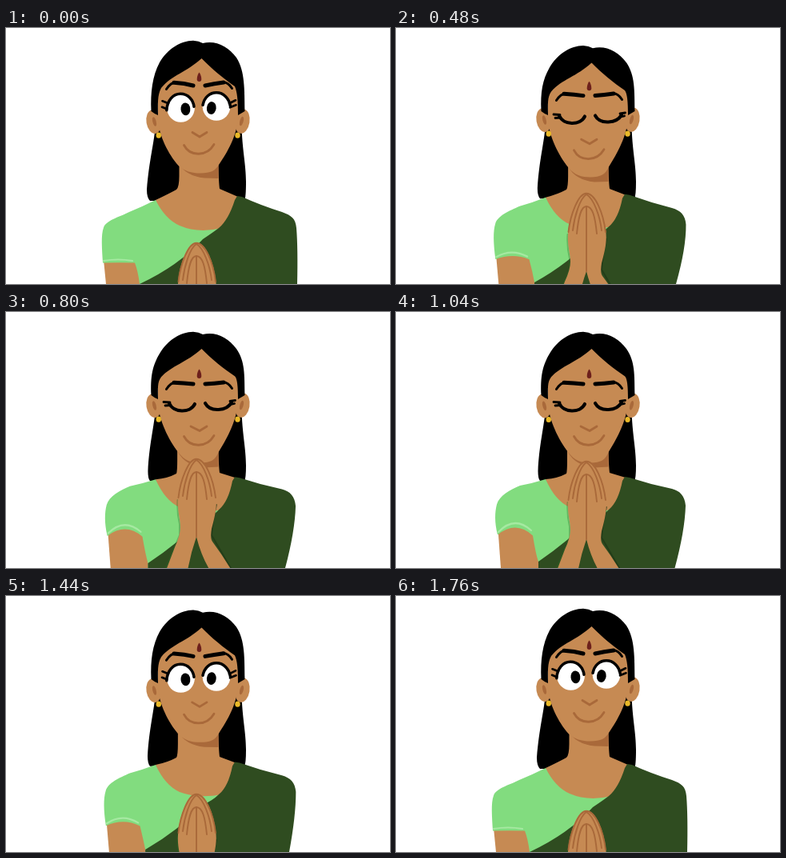
Recreate the animation shown at these times as an HTML page with a canvas. Size 480 px wide and 320 px high, loop 2080 ms.

```html
<!DOCTYPE html>
<html lang="en">
<head>
<meta charset="utf-8">
<title>Greeting</title>
<style>
html, body { margin: 0; width: 100%; height: 100%; overflow: hidden; background: #fff; }
canvas { display: block; width: 480px; height: 320px; }
</style>
</head>
<body>
<canvas id="stage" width="480" height="320"></canvas>
<script>
const ctx = document.getElementById('stage').getContext('2d');
const SKIN = '#c68a53', BROWN = '#a9693a', BLACK = '#000', LIGHT = '#82dc7f', DARK = '#2f4c20';
const LOOP = 2080;

// until (ms), head tilt, ear shift, shoulder raise, right hem x, sari fold y, fingertip y, eyes open
const poses = [
  [320, 0, 0, 0, 364, 320, 268, true],
  [480, -0.1, 0.5, 0.1, 361.5, 326, 260.3, true],
  [640, 0.7, -2, 0.55, 350, 318, 206, false],
  [800, 0.97, -0.5, 0.85, 349, 315, 190, false],
  [1040, 1, 0, 0.95, 349, 314, 183, false],
  [1280, 1, 0.3, 1, 348.5, 312, 186, false],
  [1440, 1, 0.5, 1, 348, 311, 202, false],
  [1600, 0.19, 1, 0.65, 354, 317, 247, true],
  [1760, 0.08, 0.5, 0.3, 359, 321, 261, true],
  [LOOP, 0, 0, 0, 364, 320, 268, true]
].map(([until, tilt, ear, raise, hem, fold, tip, open]) =>
  ({ until, tilt, ear, raise, hem, fold, tip, open }));

function fill(path, color) {
  ctx.fillStyle = color;
  ctx.fill(new Path2D(path));
}

function line(path, color, width) {
  ctx.strokeStyle = color;
  ctx.lineWidth = width;
  ctx.stroke(new Path2D(path));
}

function oval(x, y, rx, ry, color, angle = 0) {
  ctx.fillStyle = color;
  ctx.beginPath();
  ctx.ellipse(x, y, rx, ry, angle, 0, Math.PI * 2);
  ctx.fill();
}

function shifted(dy, draw) {
  ctx.save();
  ctx.translate(0, dy);
  draw();
  ctx.restore();
}

function drawBody({ raise: s, hem, fold }) {
  const bend = s * s;
  const neckX = 216.5 - 2.5 * s, neckY = 215 - 6 * s;
  const sariX = 289 - 3 * Math.min(1, s * 10);
  const sariY = 210 - 4 * s;
  const collar = 250 - 3 * s;
  const cuffX = 121 + 6 * s, cuffY = 293.5 - 15 * bend;
  const innerX = 161 + 10 * s, innerY = 293.5 - 14 * bend;
  const foldX = 167 + 11 * s;

  // hanging hair
  fill(`M187 120 C185 145 179 165 ${176 + 1.5 * s} ${202 - 3 * s}
    Q${176 + 1.5 * s} ${212 - 4 * s} 180 ${216 - 5 * s}
    H298 Q300 ${212 - 4 * s} 300 192 C300 170 295 152 294.5 120Z`, BLACK);

  // neck and chest
  fill(`M${neckX} 160 V185 Q${neckX} 199 213 202 Q202 208 187 ${neckY} L200 260 H275 L${sariX + 1} ${sariY + 1}
    L267 201 Q265.5 190 265.5 160Z`, SKIN);

  // arm
  fill(`M${cuffX} ${cuffY - 14} L${125 + 6 * s} 320 H${foldX + 4} V${innerY - 14}Z`, SKIN);

  // blouse
  fill(`M187 ${neckY} Q199 ${239 - 3 * s} 217 ${247 - 3 * s} Q240 ${257 - 5 * s} 270 ${collar}
    V300 L${foldX + 8} 320 H${foldX} V${fold} Q${innerX + 4} 304 ${innerX} ${innerY}
    Q${142 + 8 * s} ${293 - 8 * s - 25 * bend} ${cuffX} ${cuffY}
    C${120 + 3 * s} ${275 - 12 * s} ${118.5 + 5 * s} ${259 - 9 * s} ${122 + 4 * s} ${249.5 - 9 * s}
    C${125 + 4 * s} ${240.5 - 11 * s} ${140 + 3 * s} ${237 - 15 * s} ${154 + s} ${230 - 13 * s}
    Q171 ${223 - 9 * s} 187 ${neckY}Z`, LIGHT);
  line(`M${cuffX + 1} ${291 - 16 * bend} Q${140 + 8 * s} ${288 - 10 * s - 24 * bend}
    ${158 + 11 * s} ${291 - 18 * bend}`, '#a6e9a2', 2.2);

  // sari
  fill(`M${sariX} ${sariY} L${sariX + 6} ${sariY + 1} Q318 ${221.5 - 6 * s} 345 ${230 - 9 * s}
    C${357 - 2 * s} ${234.5 - 11 * s} ${362 - s} ${238 - 8 * s} ${363 - s} ${250 - 8 * s}
    Q${365 - 4 * s} ${276 - 2 * s} ${hem} 320
    H${foldX} V${fold} Q216 ${1.4 * fold - 151} 246 ${fold - 56} Q258 256 266 ${collar}
    Q278 ${240 - 3 * s} ${sariX - 3} ${sariY + 5}Z`, DARK);
}

function drawEars(dy) {
  shifted(dy, () => {
    oval(184.5, 117.3, 9, 15, SKIN, -0.16);
    oval(295.5, 116.8, 9, 15.2, SKIN, 0.16);
    oval(185.5, 117, 2.2, 6, BROWN, -0.25);
    oval(294.5, 116.5, 2.2, 6, BROWN, 0.25);
  });
}

function drawHead({ tilt: t, ear }) {
  const jaw = 7 * t, parting = 8 * t, top = 9 * t;
  fill(`M215 ${168 + jaw} Q224 ${185 + jaw} 248 ${187.5 + jaw} L265.5 ${188 + jaw * 0.8} V160 H215Z`, BROWN);
  drawEars(ear);
  fill(`M190 60 V115 C191 134 203 ${158 + jaw * 0.3} 215.5 ${172 + jaw * 0.5}
    C223 ${179 + jaw} 232 ${181.5 + jaw} 243 ${181.5 + jaw}
    C256 ${181.5 + jaw} 262 ${178 + jaw} 266 ${171 + jaw * 0.5}
    C277 ${155 + jaw * 0.3} 289 134 290 112 V60 L244 ${34 + parting}Z`, SKIN);

  // hair cap with a centre parting
  fill(`M181.5 104 C180.5 80 183 ${60 + top * 0.8} 192 ${43 + top}
    C202 ${26 + top} 218 ${16 + top} 234 ${15.7 + top}
    Q241 ${16 + top} 246 ${19 + top} C262 ${15 + top} 278 ${23 + top} 288 ${37 + top}
    C299 ${54 + top * 0.9} 298 78 298.5 104 L290 109
    C290 ${90 + top * 0.3} 289 ${80 + top * 0.3} 286 ${73 + top * 0.8}
    C272 ${63 + parting} 257 ${51 + parting} 244.5 ${38 + parting}
    C226 ${55 + parting} 207 ${59 + parting} 194 ${75 + top * 0.7}
    C189 ${84 + top * 0.4} 190 95 190 109 Q185 107 181.5 104Z`, BLACK);

  shifted(ear, () => {
    for (const x of [190.8, 289.5]) oval(x, 134.2, 3.2, 3.6, '#eab928');
  });
}

function drawOpenEyes() {
  oval(218.5, 99.7, 17.4, 17.8, '#fff');
  oval(263, 98.2, 17.3, 17.2, '#fff');
  oval(224.4, 101, 5.9, 7.9, BLACK, -0.1);
  oval(256.8, 99.7, 5.9, 7.9, BLACK, 0.1);
  line('M200.8 102.5 C201.5 90 209 82 218 82 C228 82 234 90 235 98', BLACK, 3.5);
  line('M246 96 C248 86 255 80.5 263 80.5 C272 80.5 279 88 280.3 97', BLACK, 3.5);
  line('M203 94 L195.5 91 M201 101 L195 98.5 M279 94 L287 90 M280 99 L287.5 96', BLACK, 2.7);
}

function drawClosedEyes() {
  line('M204 114 C209 126 230 127 236 115', BLACK, 4.1);
  line('M249 114 C255 125.5 276 124 282 113', BLACK, 4.1);
  line('M197 112.5 L205 113 M199 117 L206 116.5 M280 111.5 L286.5 110.5 M279 116 L285.5 114.5', BLACK, 2.8);
}

function drawFace({ tilt: t, open }) {
  shifted(16 * t, () => fill('M241.5 55.5 C243 57 244.3 61 244.3 64 Q244.3 67 241.5 67 Q238.7 67 238.7 64 C238.7 61 240 57 241.5 55.5Z', '#6d201c'));
  shifted(20 * t, () => {
    line('M200.5 76.5 Q206 68 212 68', BLACK, 3);
    line(`M210 68.3 Q223 69 234 ${72 - 2 * t}`, BLACK, 5);
    line(`M249 ${72 - 2 * t} Q260 69.5 272 68`, BLACK, 5);
    line('M271 67.5 Q278 68 282.5 75.5', BLACK, 3);
  });
  if (open) shifted(16 * t + 0.3, drawOpenEyes);
  else shifted(15 * (t - 1), drawClosedEyes);
  shifted(12.5 * t, () => line(`M${233 - 2 * t} 130.5 L242 136 L251 130.5`, BROWN, 2.8));
  shifted(9 * t, () => line('M222.5 146.5 C230 161 251 161 260 145.5', BROWN, 2.8));
}

function drawHands() {
  // soft edges where the arms overlap the cloth
  line('M214.5 52 Q213.5 68 217 82 V96 L199 139', '#296a2555', 2);
  line('M263 58 Q258 78 257 96 L282 139', '#1c341599', 2);
  fill(`M238 0 C231 0 224 11 220 25 Q215 40 215 52 C214 66 218 76 218 86 Q218 96 211 111
    L200 140 H227 Q231 118 238 98 Q244 122 255 140 H282 Q270 120 258 104
    Q255 100 257 88 C262 70 264 59 262 46 Q260 30 254 16 Q246 0 238 0Z`, SKIN);
  line('M215.5 49 C218 27 228 0.8 238 0.8 C249 0.8 259 25 262 49', BROWN, 1.9);
  line('M221 47 C223 29 230 7 238 2 C247 7 255 29 257 47', BROWN, 1.9);
  line('M226 51 C228 31 231 17 238 17 C246 17 249 31 251 51', BROWN, 1.9);
  line('M238 17 V98', BROWN, 1.9);
}

function render(time) {
  const now = time % LOOP;
  const pose = poses.find(p => now < p.until);
  ctx.fillStyle = '#fff';
  ctx.fillRect(0, 0, 480, 320);
  ctx.lineCap = ctx.lineJoin = 'round';
  drawBody(pose);
  drawHead(pose);
  drawFace(pose);
  shifted(pose.tip, drawHands);
}

const start = performance.now();
function tick() {
  render(performance.now() - start);
  requestAnimationFrame(tick);
}
tick();
</script>
</body>
</html>
```
